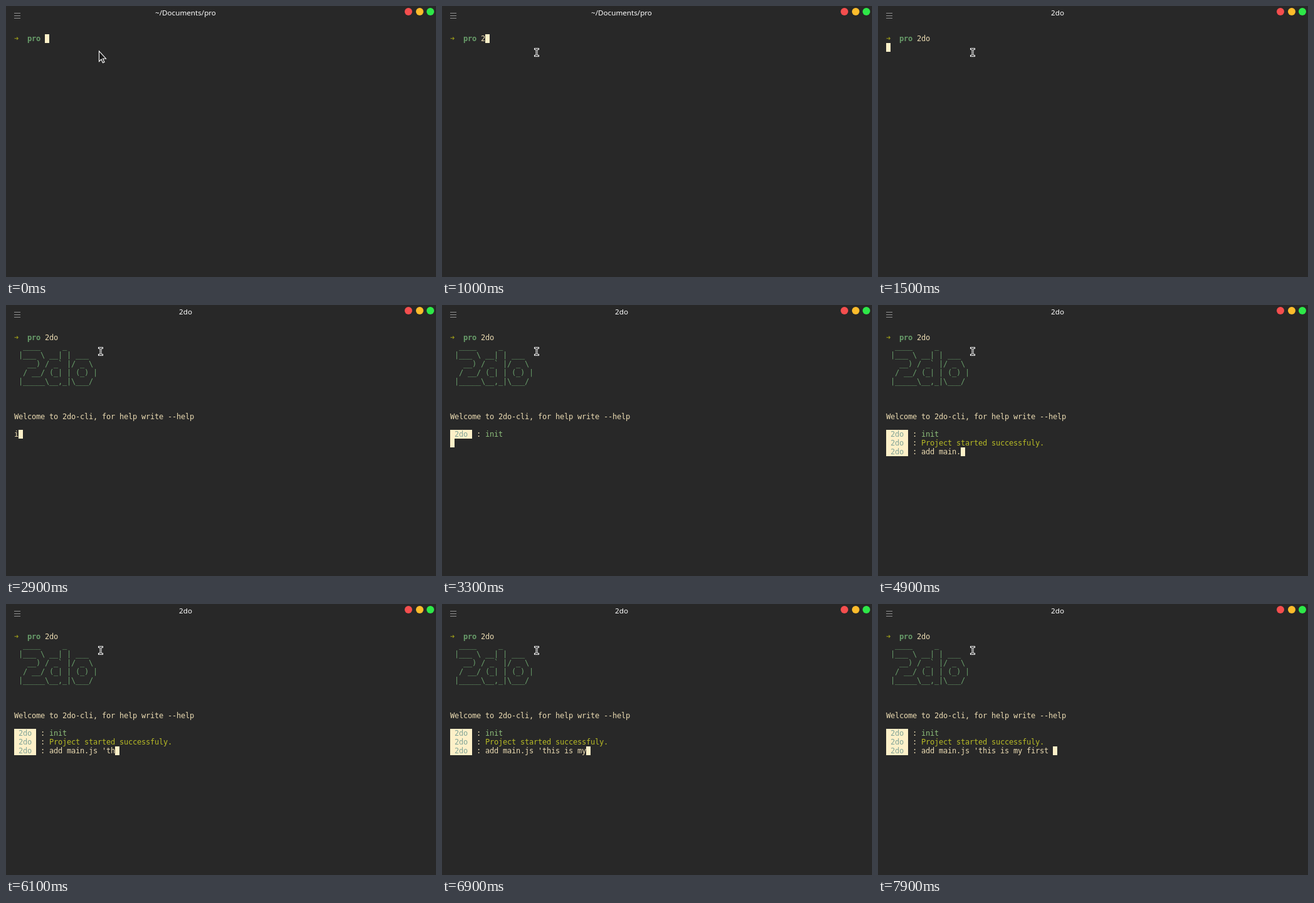
An HTML page that plays this animation: 686 by 432 pixels, repeating every 8 s.

```html
<!DOCTYPE html>
<html lang="en">
<head>
<meta charset="utf-8">
<title>2do terminal</title>
<style>
  html, body { margin: 0; width: 100%; height: 100%; overflow: hidden; background: #282828; }
  svg { display: block; width: 686px; height: 432px; }
  #screen text { font: 12px "DejaVu Sans Mono", monospace; white-space: pre; }
  #screen text.bold { font-weight: bold; }
  #title { font: 11.65px "Noto Sans", "Open Sans", sans-serif; fill: #fff; text-anchor: middle; }
</style>
</head>
<body>
<svg viewBox="0 0 686 432">
  <rect width="686" height="432" fill="#282828"/>
  <path d="M13 11.5h10M13 15.5h10M13 19.5h10" stroke="#929292"/>
  <text id="title" x="286.5" y="15"></text>
  <circle cx="642" cy="9" r="6" fill="#f54e4e"/>
  <circle cx="660" cy="9" r="6" fill="#fdbc2c"/>
  <circle cx="677" cy="9" r="6" fill="#2ee848"/>
  <g id="screen"></g>
  <path id="arrow" d="M148.5 72V88.5L152 85L154.5 90.5L157 89.5L154.5 84H159.5Z" fill="#1c1c1c" stroke="#fff" stroke-width="1.1"/>
  <g id="beam" fill="none">
    <path d="M147 68.5h8M147 79.5h8M151 68v12" stroke="#fff" stroke-width="3"/>
    <path d="M148 68.5h6M148 79.5h6M151 68v12" stroke="#111"/>
  </g>
</svg>
<script>
const LOOP = 8000, LEFT = 13, TOP = 45, CW = 7, CH = 14;
const FG = '#ebdbb2', CREAM = '#fdf0c8', AQUA = '#689d6a', LIGHT = '#8ec07c',
      OLIVE = '#98971a', LIME = '#b8bb26', BLUE = '#83a598';

const BANNER = [
  '  ____     _',
  ' |___ \\ __| | ___',
  '   __) / _` |/ _ \\',
  '  / __/ (_| | (_) |',
  ' |_____\\__,_|\\___/'
];

// Keystrokes: time in ms, characters that appear then
const SHELL = [[1000, '2'], [1100, 'd'], [1300, 'o']];
const INIT = [[2900, 'i'], [3000, 'n'], [3100, 'i'], [3200, 't']];
const ADD = [
  [3900, 'a'], [4000, 'd'], [4100, 'd'], [4300, ' '],
  [4500, 'm'], [4600, 'a'], [4700, 'i'], [4900, 'n.'], [5000, 'j'], [5200, 's '],
  [5500, "'"], [6100, 'th'], [6200, 'i'], [6300, 's '],
  [6500, 'is'], [6600, ' m'], [6900, 'y'], [7200, ' '],
  [7500, 'fi'], [7600, 'rs'], [7800, 't'], [7900, ' ']
];
const START = 1500, READY = 2900, PROMPT = 3000, ENTER = 3300, DONE = 3400, NEXT = 3900;

const byId = id => document.getElementById(id);
const typed = (keys, t) => keys.filter(k => k[0] <= t).map(k => k[1]).join('');
const escape = s => s.replace(/&/g, '&amp;').replace(/</g, '&lt;');

function put(row, col, text, color, cls = '') {
  const xs = [...text].map((c, i) => LEFT + (col + i) * CW).join(' ');
  return `<text class="${cls}" x="${xs}" y="${TOP + row * CH + 11}" fill="${color}">${escape(text)}</text>`;
}

function block(row, col, width = 1) {
  return `<rect x="${LEFT + col * CW}" y="${TOP + row * CH}" width="${width * CW}" height="${CH}" fill="${CREAM}"/>`;
}

function prompt(row, text, color) {
  return block(row, 0, 5) + put(row, 1, '2do', BLUE) + put(row, 6, ':', FG) + put(row, 8, text, color);
}

function screen(t) {
  const cmd = typed(SHELL, t), init = typed(INIT, t), add = typed(ADD, t);
  let out = put(0, 0, '➜', OLIVE, 'bold') + put(0, 3, 'pro', AQUA, 'bold') + put(0, 7, cmd, FG);
  if (t < START) return out + block(0, 7 + cmd.length);
  if (t < READY) return out + block(1, 0);

  out += BANNER.map((line, i) => put(1 + i, 0, line, AQUA)).join('');
  out += put(9, 0, 'Welcome to 2do-cli, for help write --help', FG);
  if (t < PROMPT) return out + put(11, 0, init, FG) + block(11, init.length);

  out += prompt(11, init, t < ENTER ? FG : LIGHT);
  if (t < ENTER) return out + block(11, 8 + init.length);
  if (t < DONE) return out + block(12, 0);

  out += prompt(12, 'Project started successfuly.', LIME);
  if (t < NEXT) return out + block(13, 0);
  return out + prompt(13, add, FG) + block(13, 8 + add.length);
}

let shown = '';
function draw(t) {
  const html = screen(t);
  if (html !== shown) byId('screen').innerHTML = shown = html;
  byId('title').textContent = t < START ? '~/Documents/pro' : '2do';
  byId('arrow').style.display = t < 300 ? '' : 'none';
  byId('beam').style.display = t < 300 ? 'none' : '';
}

const begin = performance.now();
function tick() {
  draw((performance.now() - begin) % LOOP);
  requestAnimationFrame(tick);
}
tick();
</script>
</body>
</html>
```
